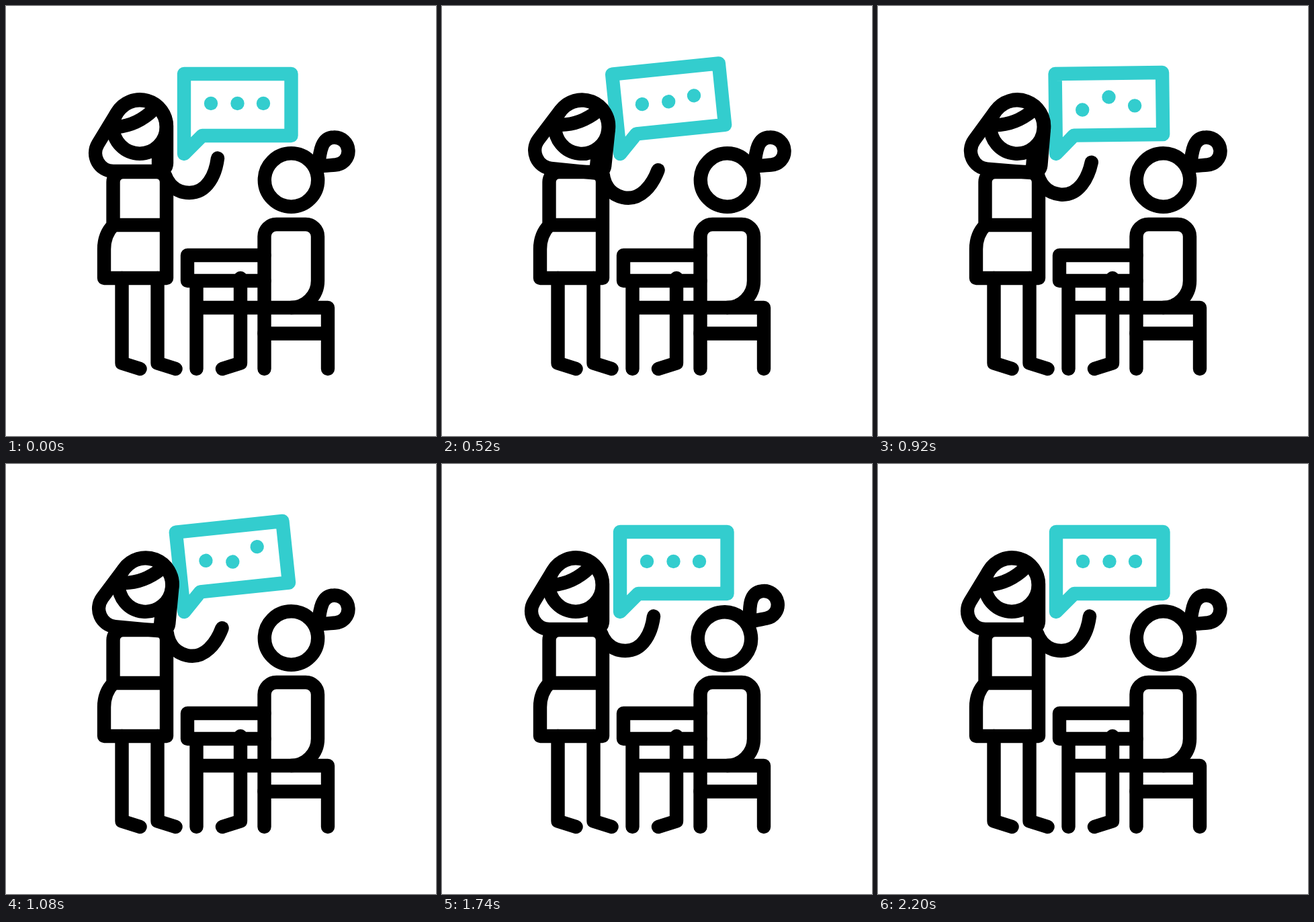
Recreate the animation shown at these times as an HTML page. Size 640 by 640 pixels, loop 2400 ms.

```html
<!DOCTYPE html>
<html lang="en">
<head>
<meta charset="utf-8">
<title>Lesson</title>
<style>
  html, body { margin: 0; width: 100%; height: 100%; overflow: hidden; background: #fff; }
  svg { display: block; width: 100vw; height: 100vh; }
  .line { fill: none; stroke: #000; stroke-width: 20.4; stroke-linecap: round; stroke-linejoin: round; }
  .teal { stroke: #33cdce; }
  .dot { fill: #33cdce; }
</style>
</head>
<body>
<svg viewBox="0 0 640 640">
  <defs><path id="leg" d="M0 0V126.500L27 135"/></defs>
  <g id="bubble">
    <path class="line teal" d="M265 220V101H424.5V193H292Z"/>
    <circle class="dot" cx="305" cy="145" r="10.2"/>
    <circle class="dot" cx="344.5" cy="145" r="10.2"/>
    <circle class="dot" cx="383" cy="145" r="10.2"/>
  </g>
  <g class="line">
    <!-- teacher -->
    <path d="M159.5 326V262A15 15 0 0 1 174.5 247H224A15 15 0 0 1 239 262V405H146V362C146 347 150 336 160 326H239"/>
    <use href="#leg" x="172.5" y="405"/>
    <use href="#leg" x="225.5" y="405"/>
    <path id="arm" d="M237 252C243 268 256 278 273 278C300 278 312 250 315 226.5"/>
    <g id="teacher">
      <circle cx="199" cy="180" r="39.7"/>
      <path d="M239 180V234A12 12 0 0 1 227 246H160A27 27 0 0 1 137 205L165 159A39.7 39.7 0 0 1 239 180"/>
      <path d="M165 180Q195 178 220 154M227 222V236"/>
    </g>
    <!-- table, chair and pupil -->
    <path d="M384.5 371H270V409H384.5M283.5 409V540M283.5 449H384.5"/>
    <use href="#leg" transform="translate(349 405) scale(-1 1)"/>
    <path d="M384.5 540V343A18 18 0 0 1 402.5 325H446A18 18 0 0 1 464 343V409A40 40 0 0 1 424 449"/>
    <path d="M384.5 449H479V540M384.5 487.5H479"/>
    <g id="pupil">
      <circle cx="424.5" cy="259" r="39.7"/>
      <path d="M465 238C467 216 470 195.500 488 195.500A20.500 20.500 0 0 1 490 236.500C482 237 474 238 465 238"/>
    </g>
  </g>
</svg>
<script>
  const LOOP = 2400, STEP = 20;
  const part = id => document.getElementById(id);
  const bubble = part('bubble'), arm = part('arm');
  const teacher = part('teacher'), pupil = part('pupil');
  const dots = document.querySelectorAll('.dot');

  // Eased rise to 1 at the peak and fall back, each lasting gap
  function bump(t, peak, gap) {
    const u = Math.max(0, 1 - Math.abs(t - peak) / gap);
    return u * u * (3 - 2 * u);
  }

  // Two swings of one size with another value between them
  function wave(t, start, gap, swing, middle) {
    const at = n => bump(t, start + n * gap, gap);
    return swing * (at(1) + at(3)) + middle * at(2);
  }

  const place = (el, value) => el.setAttribute('transform', value);
  const turn = (angle, x, y) => `rotate(${angle} ${x} ${y})`;

  function draw(t) {
    place(bubble, turn(wave(t, 200, 295, -6, 3), 265, 218));
    dots.forEach((dot, i) =>
      place(dot, `translate(0 ${wave(t, 200 + 200 * i, 240, 10, -10)})`));
    place(arm, turn(wave(t, 200, 300, 13.2, 0), 241, 264));

    const shift = wave(t, 200, 300, 4, 4);
    const nod = wave(t, 200, 270, 6.5, 0);
    place(teacher, `translate(${shift} 0) ${turn(nod, 200, 228)}`);
    place(pupil, turn(-15.5 * bump(t, 1900, 300), 431, 293));
  }

  const begin = performance.now();
  function tick() {
    const t = (performance.now() - begin) % LOOP;
    draw(Math.floor(t / STEP) * STEP);
    requestAnimationFrame(tick);
  }
  tick();
</script>
</body>
</html>
```
